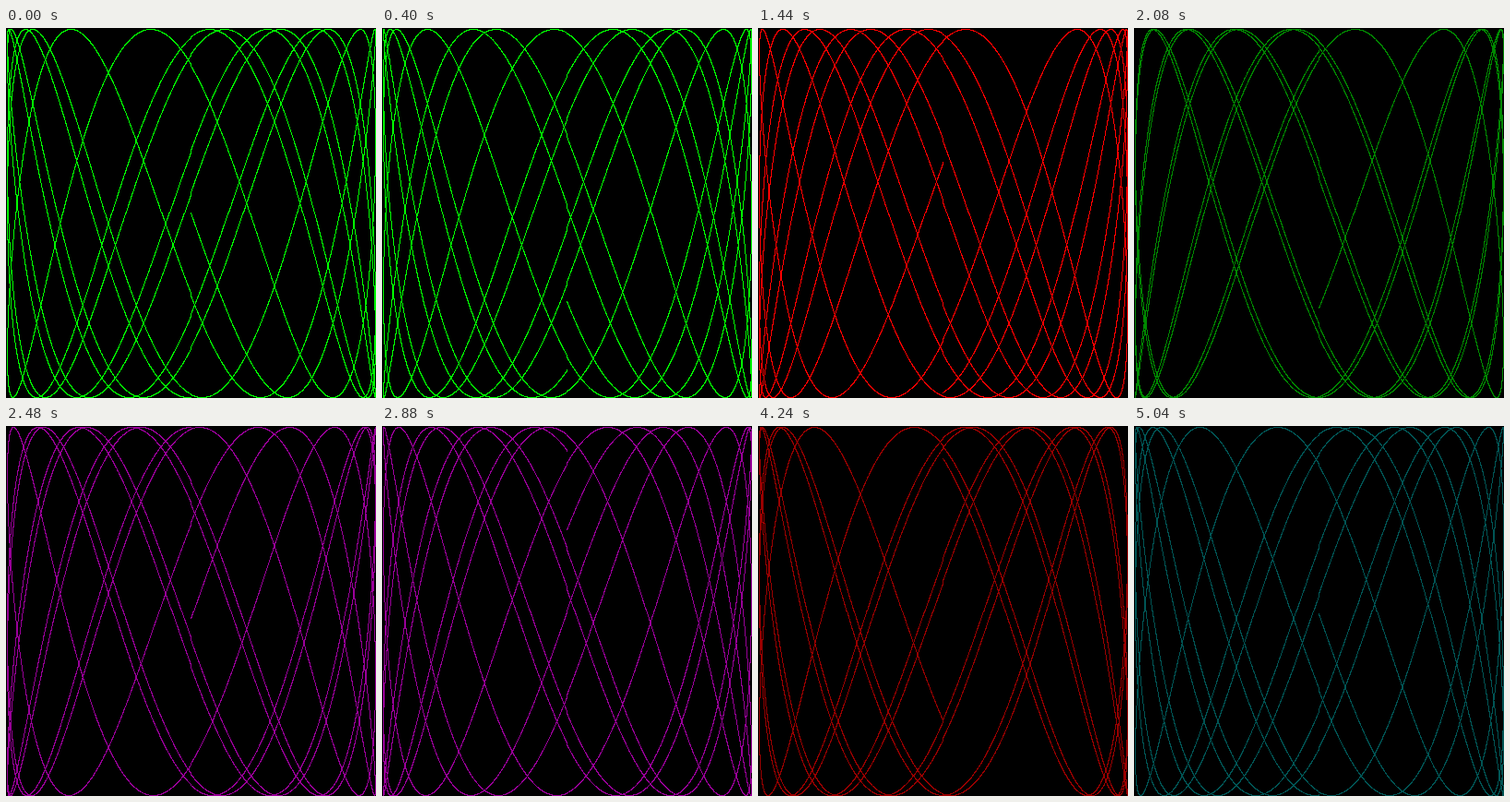
Recreate the animation shown at these times as an HTML page with a canvas. Size 401 by 401 pixels, loop 5120 ms.

```html
<!DOCTYPE html>
<html lang="en">
<head>
<meta charset="utf-8">
<title>Lissajous</title>
<style>
  html, body { margin: 0; width: 100%; height: 100%; overflow: hidden; background: #000; }
  canvas { display: block; width: 401px; height: 401px; image-rendering: pixelated; }
</style>
</head>
<body>
<canvas id="stage" width="401" height="401"></canvas>
<script>
  const SIZE = 200;
  const SIDE = 2 * SIZE + 1;
  const CYCLES = 5;
  const RES = 0.001;
  const FREQ = 2.8519;
  const STEPS = 64;
  const DELAY = 80;
  const COLORS = [
    [0, 255, 0], [255, 0, 0], [0, 136, 0], [153, 0, 153],
    [0, 204, 204], [153, 0, 0], [0, 85, 85]
  ];

  const ctx = document.getElementById('stage').getContext('2d');
  const image = ctx.createImageData(SIDE, SIDE);
  const pixels = new Uint32Array(image.data.buffer);
  const pack = ([r, g, b]) => (255 << 24 | b << 16 | g << 8 | r) >>> 0;
  const BLACK = pack([0, 0, 0]);

  // Truncates toward zero, which leaves the small jogs on both axes.
  const place = v => SIZE + Math.trunc(v * SIZE + 0.5);

  function draw(step) {
    const phase = step * 0.1;
    const color = pack(COLORS[Math.floor(step * COLORS.length / STEPS)]);
    pixels.fill(BLACK);
    for (let t = 0; t < CYCLES * 2 * Math.PI; t += RES) {
      const x = place(Math.sin(t));
      const y = place(Math.sin(t * FREQ + phase));
      pixels[y * SIDE + x] = color;
    }
    ctx.putImageData(image, 0, 0);
  }

  const start = performance.now();
  let shown = 0;

  function tick() {
    const step = Math.floor((performance.now() - start) / DELAY) % STEPS;
    if (step !== shown) draw(shown = step);
    requestAnimationFrame(tick);
  }

  draw(0);
  requestAnimationFrame(tick);
</script>
</body>
</html>
```
